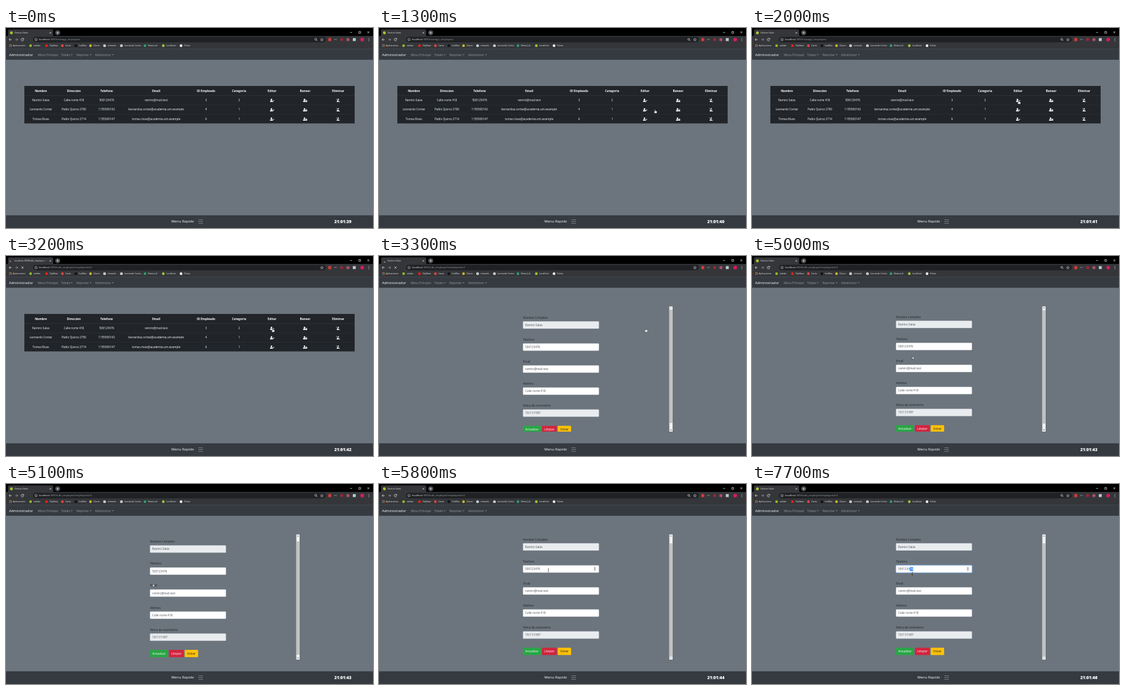
Write an HTML page that moves like this. It is 600 px wide and 328 px high and loops after 8000 ms.

```html
<!DOCTYPE html>
<html lang="es">
<head>
<meta charset="utf-8">
<title>Administrador</title>
<style>
  html, body { margin: 0; width: 100%; height: 100%; overflow: hidden; background: #6c757d; }
  svg { display: block; width: 600px; height: 328px; }
  text { font-family: "Open Sans", "Noto Sans", sans-serif; white-space: pre; }
  .line { fill: none; stroke: #e8eaed; stroke-width: .7; }
</style>
</head>
<body>
<svg id="stage" viewBox="0 0 600 328" xmlns="http://www.w3.org/2000/svg"></svg>
<script>
const LOOP = 8000, STEP = 100;
const LOAD = 3000, SHOW_FORM = 3300, LOADED = 3700, HOVER_FIELD = 5400, FOCUS = 6200;
const TICKS = [1000, 2000, 3000, 4200, 5200, 6200, 7200];
const PAGE = 4.72, UI = 3.54;

// Text placed by its vertical centre.
const text = (x, y, s, { size = PAGE, fill = '#fff', anchor = 'start', weight = 400, id = '' } = {}) =>
  `<text ${id && `id="${id}"`} x="${x}" y="${(y + size * .355).toFixed(2)}" font-size="${size}" fill="${fill}" text-anchor="${anchor}" font-weight="${weight}">${s}</text>`;
const rect = (x, y, w, h, fill, extra = '') =>
  `<rect x="${x}" y="${y}" width="${w}" height="${h}" fill="${fill}" ${extra}/>`;
const dot = (x, y, r, fill, extra = '') => `<circle cx="${x}" cy="${y}" r="${r}" fill="${fill}" ${extra}/>`;
const path = (d, extra = 'class="line"') => `<path d="${d}" ${extra}/>`;
const use = (id, x, y) => `<use href="#${id}" x="${x}" y="${y}"/>`;

const person = '<circle cx="-1" cy="-1.3" r="1.35"/><path d="M-3.3 2.6V1.7Q-3.3.3-1.8.3H0Q1.2.4 1.2 1.7V2.6Z"/>';
const defs = `<defs>
  <clipPath id="view"><rect x="220" y="82.5" width="254" height="205.5"/></clipPath>
  <linearGradient id="fade"><stop offset="0" stop-color="#35363a" stop-opacity="0"/><stop offset="1" stop-color="#35363a"/></linearGradient>
  <g id="edit" fill="#fff">${person}<path d="M.2 2.2L2.9-.7L3.7.1L1.1 2.7L0 2.9Z" stroke="#212529" stroke-width=".3"/></g>
  <g id="ban" fill="#fff">${person}<rect x=".4" y=".2" width="3.1" height="2.5" rx=".4" stroke="#212529" stroke-width=".3"/><path d="M1.1.3V-.5Q1.95-1.6 2.8-.5V.3" fill="none" stroke="#fff" stroke-width=".5"/></g>
  <g id="remove" fill="#fff"><g transform="translate(1)">${person}</g><path d="M-3-2.7L3.2 2.5" stroke="#212529" stroke-width="1.4"/><path d="M-3.2-2.4L3 2.7" stroke="#fff" stroke-width=".6"/></g>
  <g id="globe">${dot(0, 0, 2.3, '#e8eaed')}<path d="M-1.4-1.2Q0-.6-.4.4T.2 1.8M.6-1.8Q.4-.4 1.8.2" fill="none" stroke="#5f6368" stroke-width=".6"/></g>
</defs>`;

function browser() {
  const bookmarks = [
    [45, 'salidas', '#8bb92d'], [71, 'ClipNow', '#e62117'], [97, 'Carta', '#d9483b'],
    [119, 'CodBox', '#111'], [143, 'Clases', '#c3b52c'], [166, 'sitioweb'],
    [193.5, 'Leonardo Cortez'], [232, 'Notas Juli', '#2f9d68'], [262, 'Localhost', '#9bc53d'], [291, 'Fichas', '#f1f1f1']
  ];
  const apps = ['#ea4335', '#fbbc05', '#34a853', '#4285f4'];
  let out = rect(0, 0, 600, 14, '#000') + rect(0, 13, 600, 21.6, '#35363a');
  out += path('M2 13.5Q3.3 13 3.3 11V4.5Q3.3 2.3 5.5 2.3H75Q77.2 2.3 77.2 4.5V11Q77.2 13 78.5 13.5Z', 'fill="#35363a"');
  out += dot(8.8, 8, 2.4, '#a5c62b', 'id="favicon"')
    + path('M8.8 5.8A2.2 2.2 0 0 1 11 8', 'id="spinner" class="line"')
    + text(14, 8, '', { size: UI, fill: '#e8eaed', id: 'title' })
    + rect(58, 4, 11, 8, 'url(#fade)') + rect(69, 4, 7, 8, '#35363a')
    + path('M71.3 6.8L73.7 9.2M73.7 6.8L71.3 9.2')
    + dot(84.5, 7.8, 4.1, '#4a4b4e') + path('M82.4 7.8H86.6M84.5 5.7V9.9');
  out += path('M562.5 7.3H565.8M576.8 5.7H579.8V8.7H576.8ZM590.8 5.5L594 8.7M594 5.5L590.8 8.7');
  // Toolbar
  out += path('M9.2 19H5M7 17L5 19L7 21')
    + path('M15 19H19.2M17.2 17L19.2 19L17.2 21', 'class="line" opacity=".6"')
    + path('M28.6 17.8A2.1 2.1 0 1 0 28.9 19.6M29 16.6V18.3H27.2', 'id="reload" class="line"')
    + path('M25.3 17.3L28.7 20.7M28.7 17.3L25.3 20.7', 'id="stop" class="line"')
    + rect(44, 14.6, 479, 8.8, '#202124', 'rx="4.4"')
    + path('M51.1 19A2 2 0 1 1 47.1 19A2 2 0 1 1 51.1 19M49.1 18.8V20.2M49.1 17.7V18.2', 'class="line" style="stroke-width:.5"')
    + text(54, 19, '', { size: 4.13, fill: '#9aa0a6', id: 'url' })
    + `<g id="zoom">${dot(506.4, 18.5, 1.5, 'none', 'stroke="#e8eaed" stroke-width=".7"')}${path('M507.5 19.6L509 21.1')}</g>`
    + path('M516.5 16.6L517.2 18.2L519 18.4L517.6 19.5L518.1 21.3L516.5 20.3L514.9 21.3L515.4 19.5L514 18.4L515.8 18.2Z', 'class="line" style="stroke-width:.5"')
    + rect(527, 16.5, 4.6, 5, '#d93a3a') + rect(536.2, 18.2, 4.6, 1.2, '#77797d')
    + dot(548.8, 19, 2.5, '#9b2636') + dot(559, 19, 2.6, '#a8506b')
    + rect(567, 16.6, 4.8, 4.8, '#bcc8cc') + dot(582.3, 19, 3, '#d81b60')
    + [17, 19, 21].map(y => dot(593.2, y, .55, '#e8eaed')).join('');
  // Bookmarks
  for (let i = 0; i < 9; i++) out += rect(5 + i % 3 * 1.6, 26.8 + (i / 3 | 0) * 1.6, 1.1, 1.1, apps[i % 4]);
  out += text(11.3, 29, 'Aplicaciones', { size: UI, fill: '#e8eaed' });
  for (const [x, name, color] of bookmarks)
    out += (color ? dot(x - 4.8, 29, 2.2, color) : use('globe', x - 4.8, 29))
      + text(x, 29, name, { size: UI, fill: '#e8eaed' });
  return out;
}

function bars() {
  const links = [[52, 'Menu Principal'], [90, 'Tickets', 107.5], [115.3, 'Reportes', 138.3], [145.8, 'Administrar', 174.8]];
  let out = rect(0, 34.6, 600, 17.5, '#343a40') + rect(0, 307.2, 600, 20.8, '#343a40');
  out += text(5, 44, 'Administrador', { size: 5.9 });
  for (const [x, name, caret] of links) {
    out += text(x, 43.9, name, { fill: '#999c9f' });
    if (caret) out += path(`M${caret - 1.5} 43.2h3l-1.5 1.6Z`, 'fill="#999c9f"');
  }
  out += text(270.2, 317.2, 'Menu Rapido', { size: 6 })
    + rect(309.5, 311.2, 17.4, 12.4, 'none', 'rx="1.2" stroke="#484e53" stroke-width=".3"')
    + path('M314.4 314.6h7.6M314.4 317.5h7.6M314.4 320.4h7.6', 'stroke="#a2a5a8" stroke-width=".65"');
  return out + text(550.7, 317.7, '', { size: 6.85, anchor: 'middle', weight: 800, id: 'clock' });
}

function table() {
  const cols = [57, 111, 164.5, 245.5, 327, 381, 435, 489, 543];
  const heads = ['Nombre', 'Direccion', 'Telefono', 'Email', 'ID Empleado', 'Categoria', 'Editar', 'Banear', 'Eliminar'];
  const rows = [
    ['Ramiro Salas', 'Calle norte 418', '500123476', 'ramiro@mail.test', 3, 2],
    ['Leonardo Cortez', 'Pablo Quiroz 2700', '1155500142', 'leonardoa.cortez@academia.um.example', 4, 1],
    ['Tomas Rivas', 'Pablo Quiroz 2714', '1155500147', 'tomas.rivas@academia.um.example', 6, 1]
  ];
  let out = rect(30, 95, 540, 61.5, '#212529');
  heads.forEach((h, i) => out += text(cols[i], 103, h, { size: 4.8, weight: 700, anchor: 'middle' }));
  rows.forEach((row, r) => {
    const y = 118.4 + r * 15.35;
    out += rect(30, y - 7.9, 540, r ? .4 : .7, '#32383e');
    row.forEach((v, i) => out += text(cols[i], y, v, { anchor: 'middle' }));
    ['edit', 'ban', 'remove'].forEach((icon, i) => out += use(icon, cols[6 + i], y + .3));
  });
  return `<g id="table">${out}</g>`;
}

function form() {
  const fields = [
    ['Nombre Completo', 'Ramiro Salas', true], ['Telefono', ''], ['Email', 'ramiro@mail.test'],
    ['Address', 'Calle norte 418'], ['Fehca de nacimiento', '15/11/1997', true]
  ];
  const buttons = [[235.4, 29.4, 'Actualizar', '#28a745', '#fff'], [266.4, 24.2, 'Limpiar', '#d3243f', '#fff'], [292.2, 21.9, 'Volver', '#ffc107', '#212529']];
  let out = '';
  fields.forEach(([label, value, locked], i) => {
    const y = 113.2 + i * 36.12;
    out += text(235.4, y - 12.2, label, { fill: '#212529' });
    if (i === 1) out += rect(234.8, y - 6.4, 125.2, 12.8, 'none', 'id="ring" rx="1.7" stroke="#5593cf" stroke-width="1"');
    out += rect(235.5, y - 5.9, 124, 11.8, locked ? '#e9ecef' : '#fff', `rx="1.2" stroke="#ced4da" stroke-width=".3"`);
    if (i === 1) out += rect(257.95, y - 3.2, 5.4, 6.6, '#3390ff', 'id="mark"')
      + text(239.1, y, '', { fill: '#495057', id: 'phone' })
      + `<g id="stepper">${rect(350.6, y - 3.4, 4.6, 6.8, '#f0f0f0')}${path(`M351.6 ${y - .9}h2.6l-1.3-1.6ZM351.6 ${y + .9}h2.6l-1.3 1.6Z`, 'fill="#505050"')}</g>`;
    else out += text(239.1, y, value, { fill: '#495057' });
  });
  for (const [x, w, label, fill, ink] of buttons)
    out += rect(x, 278.6, w, 11.9, fill, 'rx="1.2"') + text(x + w / 2, 284.5, label, { fill: ink, anchor: 'middle' });
  const bar = rect(474.6, 82.7, 5.4, 205.3, '#f1f1f1')
    + path('M476 86h2.6l-1.3-1.6Z', 'id="up" fill="#a3a3a3"') + path('M476 284.8h2.6l-1.3 1.6Z', 'id="down" fill="#505050"')
    + rect(474.9, 88, 4.8, 185.9, '#c1c1c1', 'id="thumb"');
  return `<g id="form"><g clip-path="url(#view)"><g id="content">${out}</g></g>${bar}</g>`;
}

// Pointers are drawn from their hot spot.
const pointers = '<g id="pointer">'
  + path('M0 0V5.1L1.2 4L2 5.8L2.8 5.4L2 3.7H3.6Z', 'id="arrow" fill="#fff" stroke="#000" stroke-width=".35"')
  + path('M-.5.2Q0-.3.5.2V2.4L2.8 3Q3.3 3.2 3.2 3.8L2.7 6.2H-.6L-2 4Q-1.9 3.2-1.2 3.5L-.5 4.1Z', 'id="hand" fill="#fff" stroke="#000" stroke-width=".35"')
  + path('M-1-2.6Q0-2.6 0-2V2Q0 2.6-1 2.6M1-2.6Q0-2.6 0-2M0 2Q0 2.6 1 2.6', 'id="beam" fill="none" stroke="#222" stroke-width=".6"')
  + '</g>';

document.getElementById('stage').innerHTML = defs + rect(0, 34, 600, 294, '#6c757d') + browser() + bars() + table() + form() + pointers;

const el = {};
document.querySelectorAll('#stage [id]').forEach(n => el[n.id] = n);
const show = (id, on) => el[id].style.display = on ? '' : 'none';
const put = (id, html) => { if (el[id].last !== html) el[id].innerHTML = el[id].last = html; };
const move = (id, x, y) => el[id].setAttribute('transform', `translate(${x} ${y})`);

const MOVES = [
  [100, 580, 8], [900, 457, 152], [1000, 457, 153], [1100, 457, 153], [1200, 456, 149], [1300, 451.3, 133.6],
  [2000, 436, 118.5], [3800, 436, 118.5], [4700, 283, 162], [5000, 262.2, 164.5], [5200, 218, 163],
  [5400, 270, 144], [5600, 305, 141], [5800, 277, 141.4], [5900, 277, 141.4], [6200, 264, 140],
  [6600, 259.5, 142], [6800, 261.5, 145.8], [7400, 261.5, 145.8], [7700, 262, 147.3]
];
const SCROLL = [[4900, 0], [5000, 1], [5100, 6.5], [5200, 10]];

function track(keys, t) {
  const i = keys.findIndex(k => k[0] > t);
  if (i < 0) return keys[keys.length - 1].slice(1);
  if (i === 0) return keys[0].slice(1);
  const a = keys[i - 1], b = keys[i], p = (t - a[0]) / (b[0] - a[0]);
  return a.slice(1).map((v, j) => v + (b[j + 1] - v) * p);
}

function draw(t) {
  const loading = t >= LOAD && t < LOADED, edit = t >= LOAD, formOn = t >= SHOW_FORM;
  show('favicon', !loading);
  show('spinner', loading);
  show('reload', !loading);
  show('stop', loading);
  show('zoom', !loading);
  el.spinner.setAttribute('transform', `rotate(${(formOn ? .6 : -.5) * (t - LOAD) - 60} 8.8 8)`);
  put('title', loading && !formOn ? 'localhost:9090/edit_employee?e' : 'Gestion Salas');
  put('url', '<tspan fill="#e8eaed">localhost</tspan>:9090/' + (edit ? 'edit_employee?employeeId=3' : 'manage_employees'));

  const seconds = 39 + TICKS.filter(k => k <= t).length;
  put('clock', '21:01:' + seconds);
  show('clock', t < SHOW_FORM || t >= TICKS[3]);
  show('table', !formOn);
  show('form', formOn);

  const [scroll] = track(SCROLL, t);
  move('content', 0, -scroll);
  move('thumb', 0, scroll * .93);
  el.up.setAttribute('fill', scroll > 0 ? '#505050' : '#a3a3a3');
  el.down.setAttribute('fill', scroll < 10 ? '#505050' : '#a3a3a3');

  const picked = t < 6400 ? 0 : t < 6600 ? 1 : 2, digits = '500123476', cut = digits.length - picked;
  put('phone', `${digits.slice(0, cut)}<tspan fill="#fff">${digits.slice(cut)}</tspan>`);
  el.mark.setAttribute('x', 263.4 - picked * 2.7);
  el.mark.setAttribute('width', picked * 2.7);
  show('ring', t >= FOCUS);
  show('stepper', t >= HOVER_FIELD);

  const [x, y] = track(MOVES, t);
  const kind = t >= HOVER_FIELD ? 'beam' : t < 3900 && y > 95 ? 'hand' : 'arrow';
  show('pointer', t >= 100);
  for (const k of ['arrow', 'hand', 'beam']) show(k, k === kind);
  move('pointer', x, y);
}

function frame() {
  const t = performance.now() % LOOP;
  draw(Math.floor(t / STEP) * STEP);
  requestAnimationFrame(frame);
}
frame();
</script>
</body>
</html>
```
